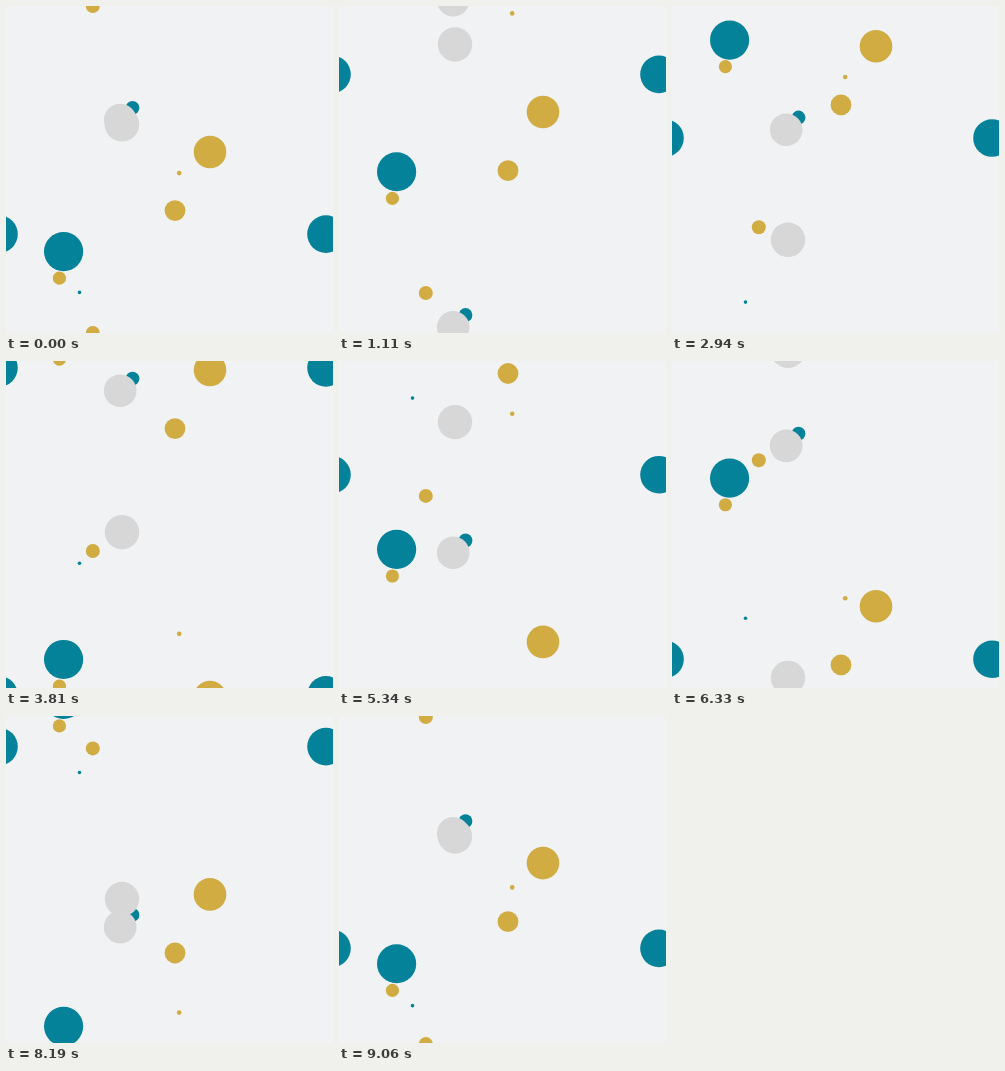
Animation of 327 by 327 pixels, one loop 9090 ms. Source, as an HTML page with a canvas:

```html
<!DOCTYPE html>
<html lang="en">
<head>
<meta charset="utf-8">
<title>Rising dots</title>
<style>
  html, body { margin: 0; width: 100%; height: 100%; overflow: hidden; background: #f0f2f4; }
  canvas { display: block; width: 327px; height: 327px; }
</style>
</head>
<body>
<canvas></canvas>
<script>
const SIZE = 327, LOOP = 9090, STEP = 30;
const TEAL = '#04829a', GOLD = '#d0ac42', GRAY = '#d7d7d7';

// x, starting y, radius, laps per loop, colour
const dots = [
  [57.6, 245.6, 19.6, 2, TEAL],
  [320, 228.1, 18.8, 4, TEAL],
  [126.5, 101.8, 6.9, 3, TEAL],
  [73.5, 286.4, 1.8, 3, TEAL],
  [204, 146, 16.3, 1, GOLD],
  [169, 204.6, 10.4, 1, GOLD],
  [86.8, 327, 7, 1, GOLD],
  [53.4, 272.2, 6.6, 2, GOLD],
  [173.2, 167.1, 2.3, 4, GOLD],
  [114.2, 114, 16.3, 3, GRAY],
  [116, 118.3, 17.2, 2, GRAY]
];

const canvas = document.querySelector('canvas');
const ctx = canvas.getContext('2d');
const scale = window.devicePixelRatio || 1;
canvas.width = canvas.height = Math.round(SIZE * scale);
ctx.scale(scale, scale);

function circle(x, y, r) {
  ctx.beginPath();
  ctx.arc(x, y, r, 0, Math.PI * 2);
  ctx.fill();
}

function draw(now) {
  const time = Math.floor((now % LOOP) / STEP) * STEP;
  ctx.fillStyle = '#f0f2f4';
  ctx.fillRect(0, 0, SIZE, SIZE);
  for (const [x, y0, r, laps, color] of dots) {
    const travel = laps * SIZE * time / LOOP;
    const y = ((y0 - travel) % SIZE + SIZE) % SIZE;
    ctx.fillStyle = color;
    // Neighbouring copies make the tile wrap on every edge
    for (const dx of [-SIZE, 0, SIZE])
      for (const dy of [-SIZE, 0, SIZE]) circle(x + dx, y + dy, r);
  }
}

const start = performance.now();
function tick() {
  draw(performance.now() - start);
  requestAnimationFrame(tick);
}
tick();
</script>
</body>
</html>
```
